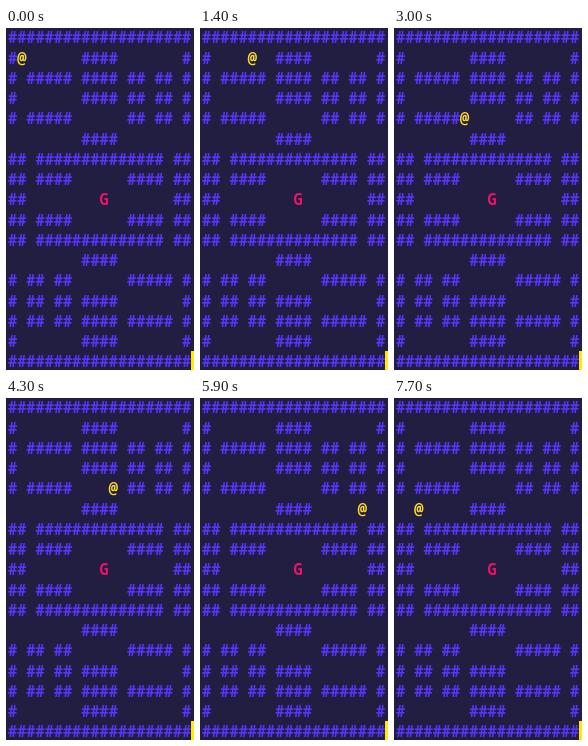
An HTML page with a canvas for the animation above (8000 ms loop, 188 by 342 pixels).

```html
<!DOCTYPE html>
<html lang="en">
<head>
<meta charset="utf-8">
<title>Maze</title>
<style>
html, body { margin: 0; width: 100%; height: 100%; overflow: hidden; background: #221e42; }
canvas { display: block; }
</style>
</head>
<body>
<canvas id="stage" width="188" height="342"></canvas>
<script>
const ctx = document.getElementById('stage').getContext('2d');
const LOOP = 8000, CELL_W = 9.16, CELL_H = 20.25, LEFT = 2, BASE = 15.3;
const COLOR = { back: '#221e42', wall: '#5835fa', ghost: '#ee1269', player: '#ffdf22', cursor: '#ffea00' };

const maze = [
  '####################',
  '#       ####       #',
  '# ##### #### ## ## #',
  '#       #### ## ## #',
  '# #####      ## ## #',
  '        ####        ',
  '## ############## ##',
  '## ####      #### ##',
  '##                ##',
  '## ####      #### ##',
  '## ############## ##',
  '        ####        ',
  '# ## ##      ##### #',
  '# ## ## ####       #',
  '# ## ## #### ##### #',
  '#       ####       #',
  '####################'
];

// Start cell, then one direction per step time.
const start = { col: 1, row: 1 };
const path = 'RRRRRRDDDRRRRRDRRRRRRRRRR';
const times = [500, 900, 1200, 1400, 1700, 1900, 2200, 2500, 3000, 3400, 3700, 3900,
  4100, 4400, 4600, 4800, 5000, 5300, 5600, 5900, 6200, 6500, 6800, 7200, 7600];

function playerAt(t) {
  let { col, row } = start;
  for (let i = 0; i < times.length && t >= times[i]; i++) {
    if (path[i] === 'D') row++;
    else col = (col + 1) % 20;
  }
  return { col, row };
}

function glyph(ch, col, row, color, weight = 700) {
  ctx.font = weight + ' 15.25px "Noto Sans Mono", monospace';
  ctx.fillStyle = color;
  ctx.fillText(ch, LEFT + col * CELL_W, BASE + row * CELL_H);
}

function draw(t) {
  ctx.fillStyle = COLOR.back;
  ctx.fillRect(0, 0, 188, 342);
  const { col, row } = playerAt(t);
  maze.forEach((line, r) => {
    [...line].forEach((ch, c) => {
      if (ch === '#') glyph(ch, c, r, COLOR.wall);
    });
  });
  glyph('G', 10, 8, COLOR.ghost);
  glyph('@', col, row, COLOR.player, 600);
  ctx.fillStyle = COLOR.cursor;
  ctx.fillRect(185, 323, 3, 19);
}

const t0 = performance.now();
function tick() {
  draw((performance.now() - t0) % LOOP);
  requestAnimationFrame(tick);
}
tick();
</script>
</body>
</html>
```
